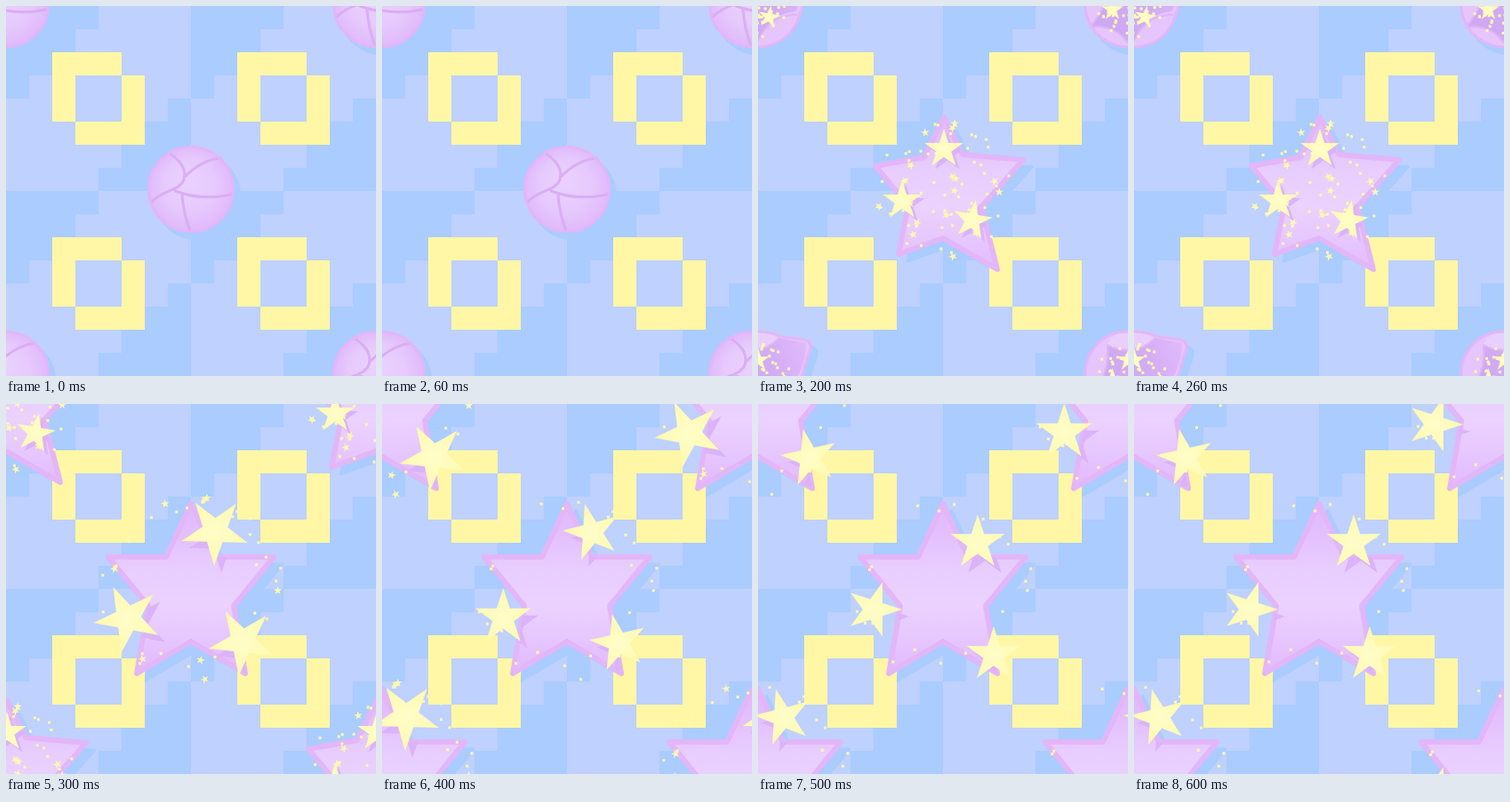
An HTML page with a canvas that plays this animation: 416 px wide and 416 px high, repeating every 0.7 s.

```html
<!DOCTYPE html>
<html lang="en">
<head>
<meta charset="utf-8">
<title>Star burst</title>
<style>
html, body { margin: 0; width: 100%; height: 100%; overflow: hidden; background: #bed1ff; }
canvas { display: block; width: 416px; height: 416px; }
</style>
</head>
<body>
<canvas id="stage" width="416" height="416"></canvas>
<script>
const ctx = document.getElementById('stage').getContext('2d');
const SIZE = 416, MID = SIZE / 2, CELL = 26, STEP = 100, STEPS = 7;
const LIGHT = '#bed1ff', BLUE = '#aaccff', YELLOW = '#fff7a5', DUST = '#fff9ad';
const EDGE = '#e3b6f8', SEAM = '#d9aef3';

// Three small stars fly from near to far, then settle at rest while they spin.
const FLIERS = [
  { near: [1, -47], far: [27, -65], rest: [39, -52], turn: 0, end: 72 },
  { near: [-46, 11], far: [-71, 33], rest: [-78, 23], turn: 0, end: 90 },
  { near: [33, 33], far: [58, 59], rest: [57, 74], turn: 10, end: 72 }
];
const FLIER_SIZE = [0, 13, 23, 39, 33, 32];
const SPIN = [0, 0, 0, 0.52, 0.8, 1];

// Dust per pose: number of grains, inner and outer radius, every nth one a star
const CLOUDS = [
  null,
  { count: 60, inner: 0, outer: 36 },
  { count: 72, inner: 0, outer: 77, spark: 4 },
  { count: 42, inner: 68, outer: 104, spark: 4 },
  { count: 27, inner: 66, outer: 104 },
  { count: 23, inner: 62, outer: 102 }
];

const lerp = (a, b, k) => a + (b - a) * k;
const clamp = (v, lo, hi) => Math.min(hi, Math.max(lo, v));

function seeded(seed) {
  return () => (seed = seed * 16807 % 2147483647) / 2147483647;
}

function polygon(points) {
  const path = new Path2D();
  points.forEach(([x, y]) => path.lineTo(x, y));
  path.closePath();
  return path;
}

function starPath(x, y, r, turn) {
  const points = [];
  for (let i = 0; i < 10; i++) {
    const a = (turn - 90 + i * 36) * Math.PI / 180, d = i % 2 ? r * 0.38 : r;
    points.push([x + d * Math.cos(a), y + d * Math.sin(a)]);
  }
  return polygon(points);
}

// Right half of an outline, from top to bottom, completed by its reflection
function mirrored(half) {
  const left = half.slice(1, -1).reverse().map(([x, y]) => [-x, y]);
  return polygon([...half, ...left].map(([x, y]) => [MID + x, MID + y]));
}

const ball = new Path2D();
ball.arc(208, 206, 47.5, 0, Math.PI * 2);
const opening = new Path2D('M160 206C160 178 181 158 208 158C220 158 228 161 236 164L260 167' +
  'Q268 169 267 177L259 202C255 226 246 240 233 247C219 256 201 256 187 249C170 241 160 225 160 206Z');
const burst = polygon([[209, 125], [230, 167], [298, 173], [251, 226], [269, 296],
  [208, 261], [158, 279], [169, 224], [132, 180], [187, 170]]);
const full = mirrored([[0, -96], [28, -36], [93, -36], [48, 19], [61, 95], [0, 59]]);
const BODIES = [ball, opening, burst, full, full, full];

function fill(path, color) {
  ctx.fillStyle = color;
  ctx.fill(path);
}

function line(path, color, width) {
  ctx.strokeStyle = color;
  ctx.lineWidth = width;
  ctx.stroke(path);
}

function blend(gradient, colors) {
  colors.forEach((c, i) => gradient.addColorStop(i / (colors.length - 1), c));
  return gradient;
}

const isBlue = (r, c) => r + c < 4 || r + c > 10;
const inSquare = (r, c, lo, hi) => Math.min(r, c) >= lo && Math.max(r, c) <= hi;
const isRing = (r, c) => inSquare(r, c, 2, 5) && !inSquare(r, c, 3, 4) && Math.abs(r - c) < 3;

function drawCells(test, color) {
  ctx.fillStyle = color;
  for (let r = 0; r < 16; r++) {
    for (let c = 0; c < 16; c++) {
      if (test(r % 8, c % 8)) ctx.fillRect(c * CELL, r * CELL, CELL, CELL);
    }
  }
}

function drawBall() {
  fill(ball, blend(ctx.createRadialGradient(204, 196, 8, 208, 206, 50), ['#e9d0ff', '#e6c9fd', '#e0b8fa']));
  line(new Path2D('M184 166C198 175 203 184 200 195C196 208 176 206 163 221' +
    'M201 192Q220 173 241 171M190 208Q218 219 254 212M198 213Q200 235 207 253'), SEAM, 3);
  line(ball, EDGE, 3);
}

function drawOpening() {
  fill(opening, '#e6c5fc');
  fill(new Path2D('M184 173Q209 188 231 165L262 171Q262 192 250 214Q222 216 207 249Q194 229 165 232Q188 206 184 173Z'),
    blend(ctx.createLinearGradient(185, 215, 264, 185), ['#cfa8f4', '#d2acf5', '#e0b9fb']));
  fill(new Path2D('M185 172Q190 159 209 159Q224 160 231 166Q211 189 185 172Z'), '#e8cffd');
  line(new Path2D('M185 173Q209 187 231 166M185 173Q188 206 165 232Q194 229 207 249Q222 216 252 218'), '#dfb5f7', 2);
  line(opening, EDGE, 3);
}

function drawStarBody(path) {
  fill(path, blend(ctx.createLinearGradient(0, 108, 0, 305),
    ['#e0b5fc', '#e4c0fe', '#e8ceff', '#ebd2ff', '#e6c6ff', '#e2b7fe']));
  line(path, EDGE, 6);
}

function flierAt(f, pose) {
  const point = [0, 1].map(i => {
    if (pose < 3) return f.near[i] * (pose === 1 ? 0.38 : 1);
    return lerp(f.far[i], f.rest[i], [0, 0.1, 1][pose - 3]);
  });
  return [MID + point[0], MID + point[1], FLIER_SIZE[pose], lerp(f.turn, f.end, SPIN[pose])];
}

function drawFlier([x, y, r, turn]) {
  fill(starPath(x, y, r, turn),
    blend(ctx.createRadialGradient(x, y, 0, x, y, r), ['#fffdc8', '#fffbbd', '#fff9ad']));
}

function drawFlierShadows(body, fliers, drop) {
  ctx.save();
  ctx.clip(body);
  for (const [x, y, r, turn] of fliers) fill(starPath(x + drop, y + drop, r, turn), '#dab3f9');
  ctx.restore();
}

function drawDust({ count, inner, outer, spark }) {
  const rnd = seeded(4711);
  ctx.fillStyle = DUST;
  for (let i = 0; i < count; i++) {
    const a = i * 2.4 + rnd() * 0.5;
    const d = lerp(inner, outer, Math.sqrt(rnd()));
    const x = MID + d * Math.cos(a), y = MID + d * Math.sin(a);
    if (spark && i % spark === 0) fill(starPath(x, y, 5, i * 14), DUST);
    else ctx.fillRect(x - 1.5, y - 1.5, 3, 3);
  }
}

function drawPose(pose) {
  if (pose === 0) return drawBall();
  const body = BODIES[pose];
  const fliers = FLIERS.map(f => flierAt(f, pose));
  if (pose === 1) {
    drawOpening();
  } else {
    drawStarBody(body);
    drawFlierShadows(body, fliers, pose > 2 ? 8 : 4);
  }
  drawDust(CLOUDS[pose]);
  fliers.forEach(drawFlier);
}

function drawShadow(pose) {
  ctx.translate(pose > 1 ? 10 : 7, 8);
  fill(BODIES[pose], BLUE);
  line(BODIES[pose], BLUE, 3);
}

function at(x, y, draw) {
  ctx.save();
  ctx.translate(x, y);
  draw();
  ctx.restore();
}

function drawScene(step) {
  // The corners run one step behind the middle; the left ones stop a pose early.
  const middle = Math.min(step, 5), right = Math.max(step - 1, 0), left = clamp(step - 1, 0, 4);
  const places = [
    [-MID, -MID, left], [-MID, MID, left],
    [MID, -MID, right], [MID, MID, right],
    [0, 0, middle]
  ];
  ctx.fillStyle = LIGHT;
  ctx.fillRect(0, 0, SIZE, SIZE);
  drawCells(isBlue, BLUE);
  for (const [x, y, pose] of places) at(x, y, () => drawShadow(pose));
  drawCells(isRing, YELLOW);
  for (const [x, y, pose] of places) at(x, y, () => drawPose(pose));
}

ctx.lineJoin = ctx.lineCap = 'round';
const start = performance.now();
let shown = -1;

function tick() {
  const step = Math.floor((performance.now() - start) / STEP) % STEPS;
  if (step !== shown) drawScene(shown = step);
  requestAnimationFrame(tick);
}
tick();
</script>
</body>
</html>
```
